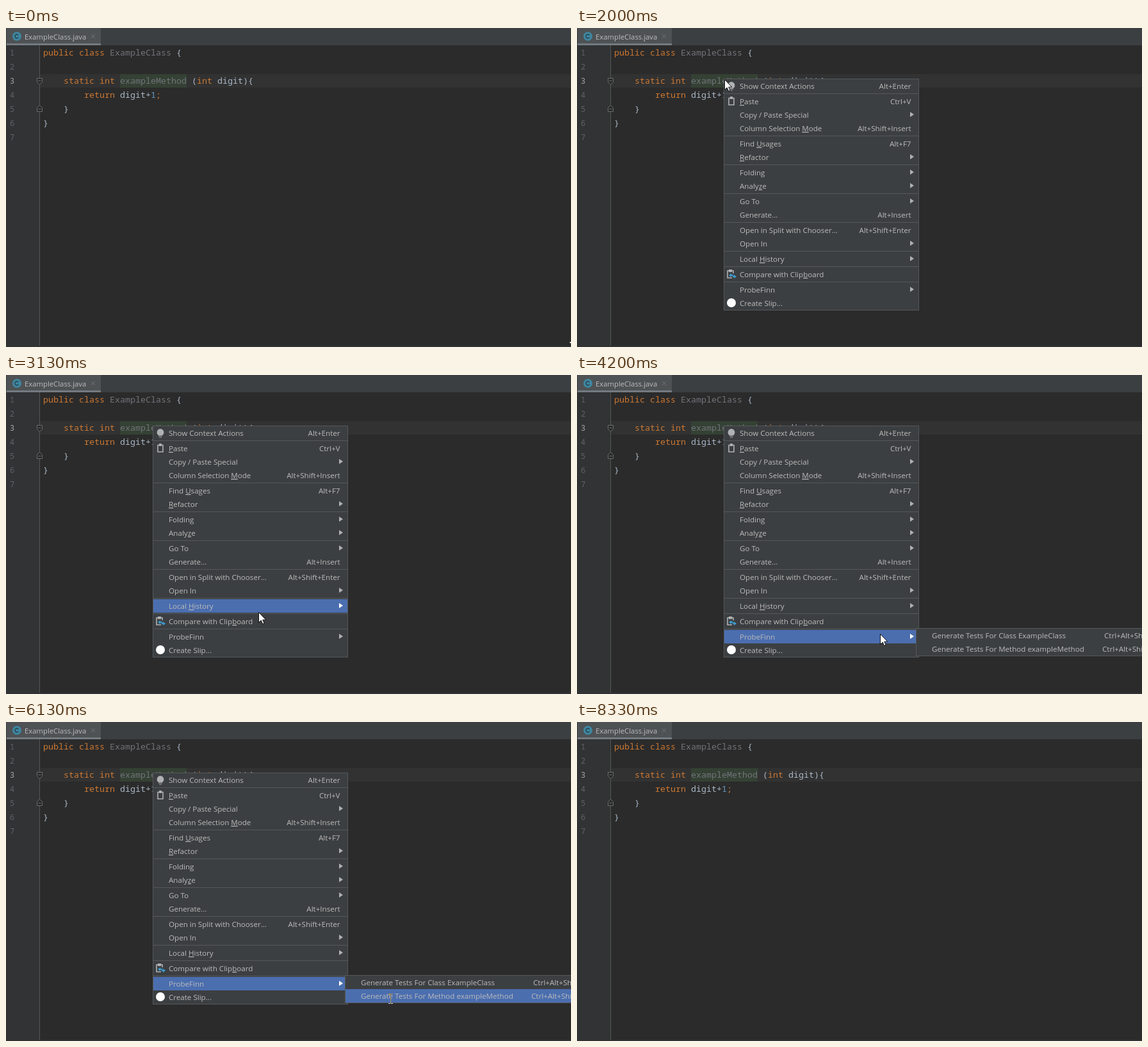
An HTML page for the animation above (8.39 s loop, 882 px wide and 498 px high).

```html
<!DOCTYPE html>
<html lang="en">
<head>
<meta charset="utf-8">
<title>Editor context menu</title>
<style>
  html, body { margin: 0; width: 100%; height: 100%; overflow: hidden; background: #2b2b2b; }
  svg { display: block; width: 882px; height: 498px; }
  text { white-space: pre; fill: #bbb; font: 11.6px "Open Sans", "Noto Sans", sans-serif; }
  .code text { fill: #a9b7c6; font: 13.333px "Noto Sans Mono", "DejaVu Sans Mono", monospace; }
  .code text.num { fill: #606366; font-size: 12px; }
  .code text.current { fill: #a4a3a3; }
  .kw { fill: #cc7832; }
  .unused { fill: #72737a; }
  .lit { fill: #6897bb; }
  .key { text-decoration: underline; }
  .box { fill: #3c3f41; stroke: #555759; }
  .hot { fill: #4b6eaf; }
  .line { stroke: #555759; }
  .fold { fill: #2b2b2b; stroke: #6a6c6e; }
  rect, .line { shape-rendering: crispEdges; }
  #beam { fill: #fff; mix-blend-mode: difference; shape-rendering: crispEdges; }
</style>
</head>
<body>
<svg id="stage" viewBox="0 0 882 498"></svg>
<script>
const STEP = 1000 / 15, LOOP = 8390;
const FOCUS = "#4a88c7", BLUR = "#747a80";

const ITEMS = [
  ["Show Context Actions", "Alt+Enter"], null,
  ["&Paste", "Ctrl+V"],
  ["Copy / Paste Special", ">"],
  ["Column Selection &Mode", "Alt+Shift+Insert"], null,
  ["Find &Usages", "Alt+F7"],
  ["&Refactor", ">"], null,
  ["Folding", ">"],
  ["Analy&ze", ">"], null,
  ["Go To", ">"],
  ["Generate...", "Alt+Insert"], null,
  ["Open in Split with Chooser...", "Alt+Shift+Enter"],
  ["Open In", ">"], null,
  ["Local &History", ">"], null,
  ["Compare with Clip&board", ""], null,
  ["ProbeFinn", ">"],
  ["Create Slip...", ""]
];

// Pointer path: step, x, y
const PATH = [
  [1, 883, 498], [4, 800, 440], [8, 500, 260], [12, 229, 99], [14, 232, 92],
  [17, 233, 81], [21, 233, 81], [23, 231, 80], [29, 231, 80], [30, 230, 80],
  [36, 230, 80], [39, 254, 128], [43, 318, 247], [47, 394, 370], [49, 406, 391],
  [51, 416, 402], [56, 416, 402], [59, 430, 403], [63, 473, 404], [67, 546, 403],
  [69, 558, 403], [74, 590, 418], [79, 600, 431], [91, 600, 431], [92, 600, 432],
  [103, 600, 432], [107, 595, 455], [111, 590, 510]
];

const $ = id => document.getElementById(id);
const rect = (x, y, w, h, fill, extra = "") =>
  `<rect x="${x}" y="${y}" width="${w}" height="${h}" fill="${fill}" ${extra}/>`;
const text = (x, y, body, extra = "") => `<text x="${x}" y="${y}" ${extra}>${body}</text>`;
const span = (name, body) => `<tspan class="${name}">${body}</tspan>`;
const kw = body => span("kw", body);

function codeLines() {
  const lines = [
    `${kw("public class")} ${span("unused", "ExampleClass")} {`,
    "",
    `    ${kw("static int")} ${span("unused", "exampleMethod")} (${kw("int")} digit){`,
    `        ${kw("return")} digit+${span("lit", "1")}${kw(";")}`,
    "    }",
    "}",
    ""
  ];
  return lines.map((line, i) =>
    text(6, 43 + 22 * i, i + 1, `class="num${i === 2 ? " current" : ""}"`) +
    text(58, 43 + 22 * i, line)).join("");
}

const rowTops = [];

function menuRows() {
  let top = 80, out = "";
  for (const item of ITEMS) {
    if (!item) {
      out += `<path class="line" d="M230 ${top + 1.5}H533"/>`;
      top += 3;
      continue;
    }
    const [label, hint] = item;
    rowTops.push(top);
    out += text(254, top + 15, label.replace(/&(.)/, span("key", "$1")));
    if (hint === ">") out += `<path class="arrow" data-top="${top}" d="M520 ${top + 6}l6 4-6 4z" fill="#afb1b3"/>`;
    else out += text(521.5, top + 15, hint, 'text-anchor="end"');
    top += 21;
  }
  return out;
}

const menuIcons = `
  <path d="M238.5 94.500A5.500 5.500 0 1 1 243.500 94.500z" fill="#afb1b3"/>
  <path d="M238 95.500h6M239 97.500h4" stroke="#8b8d8f"/>
  <path d="M237 109.500h8v10.500h-8z" fill="none" stroke="#afb1b3" stroke-width="1.600"/>
  <path d="M239 107h4v4h-4z" fill="#afb1b3"/>
  <path d="M242 390h-7v-11h9v4" fill="none" stroke="#afb1b3" stroke-width="1.600"/>
  <path d="M237 377h5v4h-5z" fill="#afb1b3"/>
  <path d="M237 386l4-3v2h3v2h-3v2zM249 388l-4-3v2h-2v2h2v2z" fill="#3e9bd0"/>
  <circle cx="241" cy="429" r="7" fill="#fff"/>`;

$("stage").innerHTML = `
  ${rect(0, 0, 882, 498, "#2b2b2b")}
  ${rect(0, 27, 52, 471, "#313335")}
  ${rect(53, 72, 829, 21, "#323232")}
  ${rect(178, 72, 104, 21, "#344134")}
  ${rect(52, 27, 1, 471, "#555")}
  ${rect(0, 496, 882, 2, "#313335")}
  ${rect(0, 0, 882, 27, "#3c3f41")}
  ${rect(1, 0, 147, 27, "#4e5254")}
  ${rect(1, 24, 147, 3, BLUR, 'id="underline"')}
  <circle cx="17" cy="13" r="7" fill="#3e86a0"/>
  <path d="M19.500 11.300a3 3 0 1 0 0 3.400" fill="none" stroke="#263b44" stroke-width="1.300"/>
  ${text(29, 18, "ExampleClass.java", 'style="font-size:11.3px"')}
  <path d="M133 10l6 6m0-6l-6 6" stroke="#6e7274"/>
  <path class="fold" d="M48.500 78.500h8v6l-4 4-4-4zM50.500 82.500h4"/>
  <path class="fold" d="M48.500 130.500h8v-6l-4-4-4 4zM50.500 126.500h4"/>
  <g class="code">${codeLines()}</g>
  ${rect(225, 73, 2, 18, "#bbb", 'id="caret"')}
  <g id="menu">
    <rect class="box" x="229.500" y="79.500" width="304" height="361"/>
    <rect class="hot" id="hot" x="230" width="303" height="21"/>
    ${menuRows()}${menuIcons}
  </g>
  <g id="submenu">
    <rect class="box" x="529.500" y="395.500" width="400" height="43"/>
    <rect class="hot" id="subHot" x="530" width="400" height="21"/>
    ${text(554, 411, "Generate Tests For Class ExampleClass")}
    ${text(823, 411, "Ctrl+Alt+Shift+C")}
    ${text(554, 432, "Generate Tests For Method exampleMethod")}
    ${text(820, 432, "Ctrl+Alt+Shift+M")}
  </g>
  <path id="beam" d="M-3-8h3v1h1v-1h3v1h-3v1v12v1h3v1h-3v-1h-1v1h-3v-1h3v-13h-3z"/>
  <path id="pointer" d="M.5.5v16l3.700-3.400 2.400 5.500 2.500-1-2.400-5.400h5z" fill="#fff" stroke="#000" stroke-width=".9"/>`;

const arrows = [...document.querySelectorAll(".arrow")];
const show = (id, on) => $(id).setAttribute("visibility", on ? "visible" : "hidden");
const within = (k, a, b) => k >= a && k < b;

function pointerAt(k) {
  const i = PATH.findIndex(p => p[0] >= k);
  if (i < 0) return PATH[PATH.length - 1].slice(1);
  if (i === 0) return PATH[0].slice(1);
  const [k0, x0, y0] = PATH[i - 1], [k1, x1, y1] = PATH[i];
  const u = (k - k0) / (k1 - k0);
  return [Math.round(x0 + (x1 - x0) * u), Math.round(y0 + (y1 - y0) * u)];
}

function draw(ms) {
  const k = Math.floor((ms % LOOP + 4) / STEP);
  const [x, y] = pointerAt(k);

  const focused = within(k, 26, 30) || within(k, 94, 125);
  const blinkOn = k < 94 || Math.floor((k - 93.15) / 7.7) % 2 === 0;
  $("underline").setAttribute("fill", focused ? FOCUS : BLUR);
  show("caret", focused && blinkOn);

  // The highlight trails slightly behind the pointer.
  const menuOpen = within(k, 30, 93);
  const trailY = k > 51 ? 402 : pointerAt(k - 0.6)[1];
  const hotTop = rowTops.filter(top => top <= trailY).pop() || rowTops[0];
  const hotOn = menuOpen && k > 36;
  show("menu", menuOpen);
  show("hot", hotOn);
  $("hot").setAttribute("y", hotTop);
  for (const arrow of arrows)
    arrow.setAttribute("fill", hotOn && +arrow.dataset.top === hotTop ? "#fff" : "#afb1b3");

  const subOpen = within(k, 54, 93);
  show("submenu", subOpen);
  show("subHot", subOpen && x > 530);
  $("subHot").setAttribute("y", y < 417 ? 396 : 417);

  const arrowOn = within(k, 30, 92);
  show("pointer", arrowOn);
  show("beam", !arrowOn && k < 112);
  for (const id of ["pointer", "beam"])
    $(id).setAttribute("transform", `translate(${x} ${y})`);
}

const start = performance.now();
function tick() {
  draw(performance.now() - start);
  requestAnimationFrame(tick);
}
tick();
</script>
</body>
</html>
```
